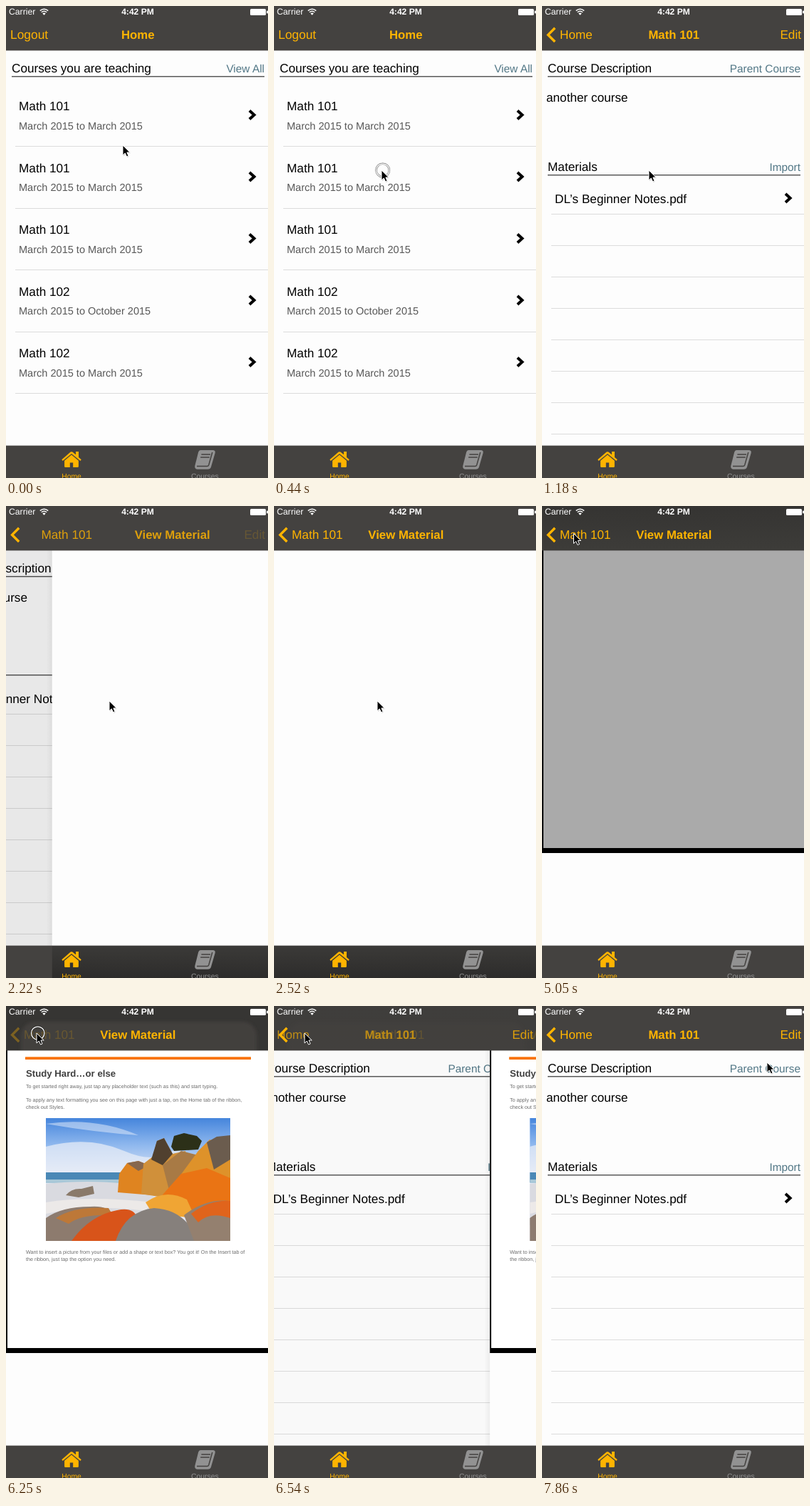
These frames come from a looping animation (368x661 px, 8 s). An HTML page:

```html
<!DOCTYPE html>
<html lang="en">
<head>
<meta charset="utf-8">
<title>Course app</title>
<style>
  html, body { margin: 0; width: 100%; height: 100%; overflow: hidden; background: #fdfdfd; }
  svg { display: block; width: 368px; height: 661px; }
  text { font-family: "Liberation Sans", Arial, sans-serif; white-space: pre; text-rendering: geometricPrecision; }
</style>
</head>
<body>
<svg id="stage" viewBox="0 0 368 661" xmlns="http://www.w3.org/2000/svg"></svg>
<script>
const GOLD = '#ffb400', LINK = '#527786', BAR = '#444240', GRAY = '#929292';
const LOOP = 8000, W = 368;

// ---- drawing helpers ----
const text = (x, y, str, size, fill = '#000', more = '') =>
  `<text x="${x}" y="${y}" font-size="${size}" fill="${fill}" ${more}>${str}</text>`;
const rect = (x, y, w, h, fill, more = '') =>
  `<rect x="${x}" y="${y}" width="${w}" height="${h}" fill="${fill}" ${more}/>`;
const path = (d, fill, more = '') => `<path d="${d}" fill="${fill}" ${more}/>`;
const stroke = (d, color, width) => path(d, 'none', `stroke="${color}" stroke-width="${width}"`);
const group = (id, body, more = '') => `<g id="${id}" ${more}>${body}</g>`;
const BOLD = 'font-weight="700"', END = 'text-anchor="end"', MID = 'text-anchor="middle"';

const arrow = y => stroke(`M342 ${y - 6}L348.6 ${y}L342 ${y + 6}`, '#000', 4);
const divider = y => rect(13, y, 355, 1, '#dcdcdc');
const section = (y, name, link) =>
  text(8, y, name, 17.2) + text(363, y, link, 15.4, LINK, END) + rect(8, y + 5, 355, 1.5, '#5a5a5a');
const view = (i, body) => group('view' + i,
  rect(-8, 62, 8, 554, 'url(#edge)') + rect(0, 62, W, 554, '#fdfdfd') + body +
  rect(0, 62, W, 554, '#000', `id="dim${i}"`));

// ---- pages ----
function homePage() {
  const ends = ['March', 'March', 'March', 'October', 'March'];
  return section(93, 'Courses you are teaching', 'View All') + ends.map((end, i) => {
    const y = 86.5 * i;
    return text(18, 146.2 + y, 'Math 10' + (i < 3 ? 1 : 2), 17.2) +
      text(18, 172.7 + y, `March 2015 to ${end} 2015`, 14.55, '#585858') +
      arrow(152.5 + y) + divider(Math.round(196 + y));
  }).join('');
}

function coursePage() {
  let lines = '';
  for (let y = 291; y < 616; y += 44) lines += divider(y);
  return section(93, 'Course Description', 'Parent Course') +
    text(6, 134, 'another course', 17.2) +
    section(231, 'Materials', 'Import') +
    text(18, 275.5, 'DL’s Beginner Notes.pdf', 17.2) + arrow(269) + lines;
}

function photo() {
  return '<g transform="translate(56 157)" clip-path="url(#frame)">' +
    rect(0, 0, 259, 172, 'url(#sky)') +
    path('M0 40Q60 24 110 46T190 36V78H0Z', '#eceff8', 'opacity=".7"') +
    path('M0 8Q70 -2 130 24Q70 20 0 8Z', '#e8f0fb', 'opacity=".5"') +
    rect(0, 76, 110, 14, '#4a88b6') + rect(0, 86, 110, 5, '#a9c8d8') +
    path('M0 92Q60 86 112 92L170 118L150 140Q70 160 0 150Z', '#d9dae0') +
    path('M0 118Q60 108 150 118L140 130Q60 120 0 134Z', '#ece9e8') +
    path('M28 108Q36 98 50 99L66 95L68 106L46 111Z', '#8a7a6a') +
    path('M176 40L180 25L194 21L212 25L219 32L214 44L180 46Z', '#2c3018') +
    path('M101 104L103 78L114 63L130 60L145 66L150 108Z', '#df8420') +
    path('M114 63L130 60L145 66L130 74Z', '#86674e') +
    path('M134 106L137 64L150 54L156 32L166 28L178 50L196 46L206 92L170 112Z', '#d0903a') +
    path('M148 58L156 32L166 28L178 50L164 66Z', '#50402f') +
    path('M164 66L190 46L214 52L212 86L176 112Z', '#a87a45') +
    path('M186 84L214 46L230 30L244 36L259 34V112L190 108Z', '#de922a') +
    path('M226 34L240 26L259 24V58L236 72Z', '#6b5c4e') +
    path('M158 114L190 78L226 70L259 84V142L200 142Z', '#ea7414') +
    path('M140 118Q168 98 198 114L210 140L150 134Z', '#f0a534') +
    path('M0 172V140Q22 124 62 124Q88 122 94 136L70 172Z', '#8d7b6e') +
    path('M14 140Q40 123 88 126L94 136Q50 134 32 148Z', '#bd7838') +
    path('M36 172Q62 136 100 129Q124 124 128 140L108 172Z', '#d8541a') +
    path('M98 172Q112 130 152 126Q196 128 214 172Z', '#86807c') +
    path('M194 136Q224 112 259 116V172H208Z', '#94806f') +
    path('M204 134Q230 114 259 116V140Q230 130 214 146Z', '#e0641c') + '</g>';
}

function materialPage() {
  const body = [
    [115, 'To get started right away, just tap any placeholder text (such as this) and start typing.'],
    [134.3, 'To apply any text formatting you see on this page with just a tap, on the Home tab of the ribbon,'],
    [143.6, 'check out Styles.'],
    [347.4, 'Want to insert a picture from your files or add a shape or text box? You got it! On the Insert tab of'],
    [356.7, 'the ribbon, just tap the option you need.']
  ];
  const sheet = rect(2, 62, 366, 417, '#fff') + rect(27, 71.3, 317, 3.7, '#f97306') +
    text(28, 98.8, 'Study Hard…or else', 13.2, '#404040', BOLD) +
    body.map(([y, line]) => text(28, y, line, 7.2, '#6a6a6a')).join('') + photo();
  return group('file', rect(0, 62, W, 424, '#000') + rect(2, 62, 366, 417, '#aaa') + group('sheet', sheet));
}

// ---- bars ----
function statusBar() {
  const wifi = stroke('M47.8 6.6Q53.5 1.8 59.2 6.6M49.8 8.8Q53.5 5.6 57.2 8.8', '#fff', 1.5) +
    path('M51.3 10.4Q53.5 8.6 55.7 10.4L53.5 12.8Z', '#fff');
  return text(4, 12.3, 'Carrier', 12.2, '#fff') + wifi +
    text(185, 12.3, '4:42 PM', 12.1, '#fff', `${BOLD} ${MID}`) +
    rect(343, 4, 22, 9, '#fff', 'rx="1.5"') + rect(366, 6.5, 2, 4, '#fff', 'rx="1"');
}

function navBar() {
  const names = ['Home', 'Math 101', 'View Material'];
  return rect(0, 0, W, 62.4, BAR) +
    group('shade', rect(0, 0, W, 62, 'url(#navShade)')) +
    group('glow', rect(0, 0, W, 62, '#363533') +
      rect(21, 22, 331, 60, '#42403d', 'rx="20" filter="url(#soft)"'), 'clip-path="url(#navBox)"') +
    statusBar() +
    names.map((n, i) => text(185.3, 46, n, 16.8, GOLD, `${BOLD} ${MID} id="title${i}"`)).join('') +
    names.slice(0, 2).map((n, i) => text(25, 46, n, 17.2, GOLD, `id="back${i}"`)).join('') +
    group('chevron', stroke('M18.2 30.8L8.6 40.4L18.2 50', GOLD, 3.4)) +
    text(6, 46, 'Logout', 17.4, GOLD, 'id="side0"') +
    text(364, 46, 'Edit', 17.2, GOLD, END + ' id="side1"');
}

function tabBar() {
  const house =
    path('M78.3 635.3L90.7 624.6Q92 623.7 93.3 624.6L98 628.3V624H102V632L105.8 635.3L104.4 637L92 627L79.7 637Z', GOLD) +
    path('M82.1 636.8L92 628.6L101.9 636.8V645.2L101 646H94.2V639.4H89.8V646H83L82.1 645.2Z', GOLD);
  const book =
    path('M273 622H291Q294.6 622.6 293.6 626.2L288 645.5Q287 648.8 283.4 648.8H268.5Q264.4 648 265.4 643.8L270.2 624.8Q271 622.2 273 622Z', GRAY) +
    stroke('M274.4 628H287M273.2 632H285.8', BAR, 1.6) +
    stroke('M268 644.6H282.4Q284.2 644.6 284.8 642.8L289.8 625', BAR, 1.5);
  return rect(0, 615.6, W, 46, BAR) + group('tabShade', rect(0, 616, W, 45, 'url(#tabDark)')) +
    house + book + text(92, 661.6, 'Home', 10.3, GOLD, MID) + text(279.3, 661.6, 'Courses', 10.4, GRAY, MID);
}

const pointer =
  group('ring', '<circle r="9.2" cx="1.7" fill="none" stroke="#000" stroke-opacity=".55" stroke-width="2.6"/>' +
    '<circle r="9.2" cx="1.7" fill="none" stroke="#fff" stroke-width="1.3"/>') +
  path('M1 1.5V15L4.2 12L6.4 17L8.6 16L6.5 11.2H11Z', '#000', 'opacity=".2"') +
  path('M0 0V14L3.3 11L5.6 16L8 15L5.9 10H10.2Z', '#000', 'stroke="#fff" stroke-width="1"');

const stop = (at, color, alpha = 1) => `<stop offset="${at}" stop-color="${color}" stop-opacity="${alpha}"/>`;
const gradient = (id, stops, dir = 'x2="0" y2="1"') => `<linearGradient id="${id}" ${dir}>${stops}</linearGradient>`;

const stage = document.getElementById('stage');
stage.innerHTML = '<defs>' +
  gradient('edge', stop(0, '#000', 0) + stop(1, '#000', .05), '') +
  gradient('sky', stop(0, '#4585dc') + stop(.22, '#8fb8ee') + stop(.48, '#e6eaf6')) +
  gradient('tabDark', stop(0, '#3b3a38') + stop(1, '#2d2c2b')) +
  gradient('navShade', stop(0, '#353432') + stop(1, '#3d3c39')) +
  '<filter id="soft"><feGaussianBlur stdDeviation="2"/></filter>' +
  `<clipPath id="frame">${rect(0, 0, 259, 172, '#000')}</clipPath>` +
  `<clipPath id="navBox">${rect(0, 0, W, 62, '#000')}</clipPath></defs>` +
  view(0, homePage()) + view(1, coursePage()) + view(2, materialPage()) +
  navBar() + tabBar() + group('pointer', pointer);

// ---- motion: each row holds until the next one ----
// depth: 0 home, 1 course, 2 material; fractions are pages sliding
const depthTrack = [
  [0, 0], [590, .3], [740, .824], [880, .98], [1030, 1],
  [2070, 1.3], [2220, 1.824], [2370, 1.98], [2520, 2],
  [6400, 1.7], [6540, 1.176], [6690, 1.02], [6840, 1]
];
const pointerTrack = [
  [0, 164, 195], [150, 165, 203], [300, 159, 221], [440, 151, 230], [1180, 150, 230],
  [1330, 148, 240], [1480, 146, 260], [1620, 145, 273],
  [3420, 149, 262], [3570, 163, 205], [3720, 122, 112], [3860, 62, 52], [4010, 44.5, 38.5],
  [6250, 43, 38], [6690, 80, 46], [6840, 180, 58], [6980, 300, 52], [7130, 344, 44],
  [7420, 340, 52], [7570, 330, 65], [7710, 320, 75], [7860, 316, 79]
];
const sheetTrack = [[0, 0], [5200, .4], [5350, .9], [5500, 1]];
const clicks = [[440, 590], [1770, 2070], [6250, 6400]];

const at = (track, t) => track.findLast(row => row[0] <= t).slice(1);
const within = (t, a, b) => t >= a && t < b;
const clamp = v => Math.max(0, Math.min(1, v));
const el = {};
stage.querySelectorAll('[id]').forEach(n => el[n.id] = n);
const fade = (id, v) => el[id].setAttribute('opacity', clamp(v));
const move = (id, x, y = 0) => el[id].setAttribute('transform', `translate(${x} ${y})`);

function draw(t) {
  const [depth] = at(depthTrack, t);
  const pressed = within(t, 6250, 6400);

  for (let i = 0; i < 3; i++) {
    const d = depth - i;
    move('view' + i, d < 0 ? -W * d : -110 * d);
    fade('view' + i, Math.abs(d) < 1 ? 1 : 0);
    fade('dim' + i, .1 * clamp(d));
    move('title' + i, d < 0 ? -275 * d : -124 * d);
    fade('title' + i, d < 0 ? 1 + d : 1 - 2 * d);
    if (i > 1) continue;
    move('back' + i, d < 1 ? 139 * (1 - d) : -120 * (d - 1));
    fade('back' + i, pressed ? (i ? .2 : 0) : d < 1 ? d : 1 - 2 * (d - 1));
    fade('side' + i, 1 - Math.abs(d));
  }
  fade('chevron', pressed ? .35 : depth);

  const open = t >= 5050 ? clamp(depth - 1) : 0;
  fade('file', t >= 5050 ? 1 : 0);
  fade('sheet', at(sheetTrack, t)[0]);
  fade('shade', open);
  fade('glow', t >= 5350 ? open : 0);
  // the tab bar darkens over the empty page sliding in beneath it
  move('tabShade', W * (2 - depth));
  fade('tabShade', within(t, 2070, 4760) ? 1 : 0);

  move('pointer', ...at(pointerTrack, t));
  fade('ring', clicks.some(([a, b]) => within(t, a, b)) ? 1 : 0);
}

const start = performance.now();
function tick() {
  draw((performance.now() - start) % LOOP);
  requestAnimationFrame(tick);
}
tick();
</script>
</body>
</html>
```
